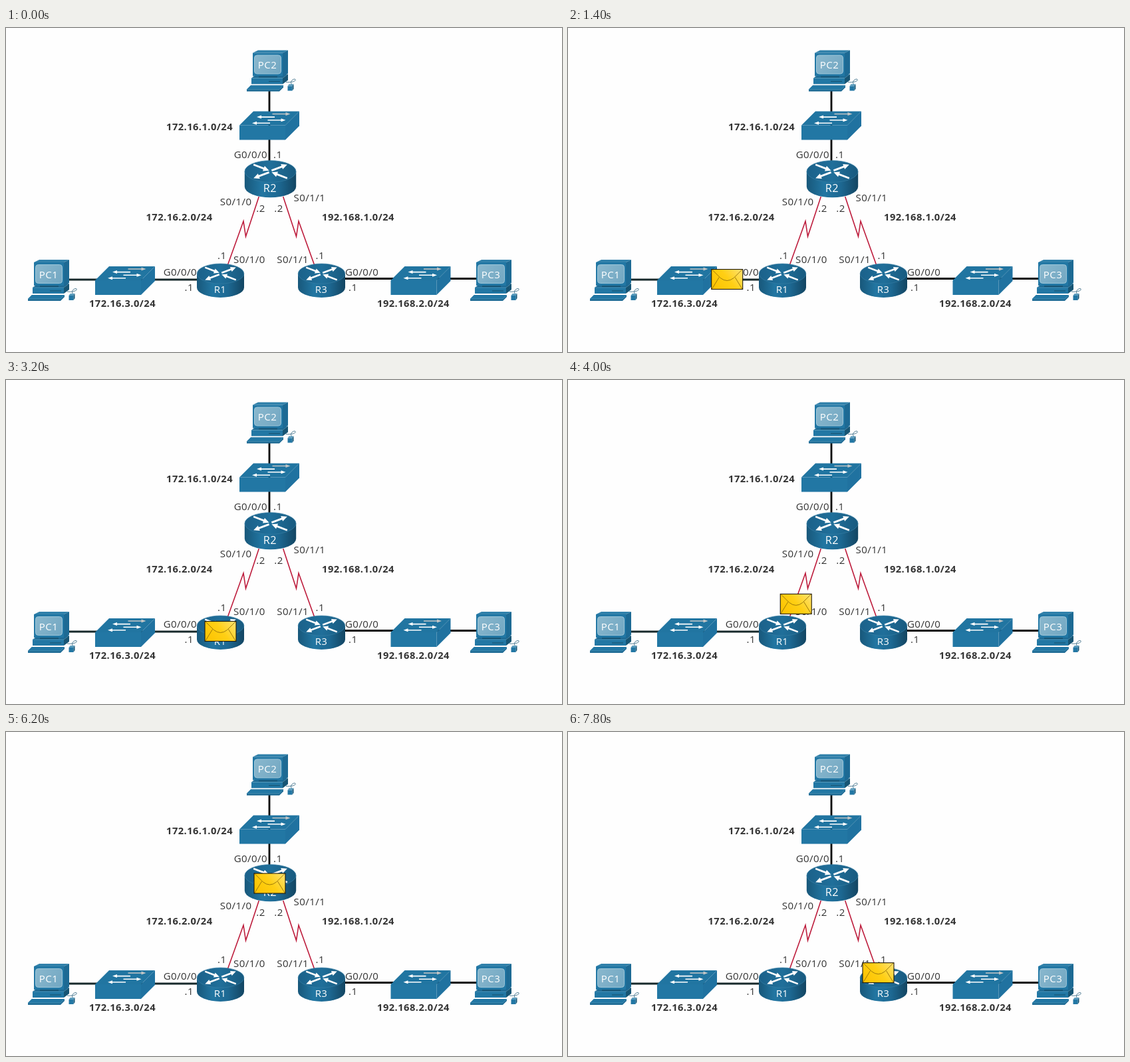
These frames come from a looping animation (836 by 488 pixels, 8000 ms). An HTML page with a canvas:

```html
<!DOCTYPE html>
<html lang="en">
<head>
<meta charset="utf-8">
<title>Packet forwarding</title>
<style>
html, body { margin: 0; width: 836px; height: 488px; overflow: hidden; background: #fefefe; }
canvas { display: block; }
</style>
</head>
<body>
<canvas id="stage" width="836" height="488"></canvas>
<script>
const ctx = document.getElementById('stage').getContext('2d');
const FONT = '"Open Sans", "Noto Sans", sans-serif';
const BLUE = '#2277a4', MID = '#1d6a94', DARK = '#175574', EDGE = '#5a9cbd';

// The packet visits these stops; every hop follows the same schedule.
const stops = [[66, 378.5], [322.5, 378.5], [396.5, 228], [474.5, 378]];
const LOOP = 8000, STEP = 200, FIRST = 610, PERIOD = 3070, TRAVEL = 1170;

const AXIS = 398.5; // the left and right branches mirror each other here
const mirror = (side, d) => AXIS + side * d;

const ramp = (t, a, b) => Math.max(0, Math.min(1, (t - a) / (b - a)));
const mix = (a, b, k) => a + (b - a) * k;

function poly(points, fill) {
  ctx.beginPath();
  points.forEach(p => ctx.lineTo(...p));
  ctx.closePath();
  ctx.fillStyle = fill;
  ctx.fill();
}

function line(points, color, width) {
  ctx.beginPath();
  points.forEach(p => ctx.lineTo(...p));
  ctx.strokeStyle = color;
  ctx.lineWidth = width;
  ctx.stroke();
}

function text(str, x, y, align = 'left', { size = 15, weight = 400, color = '#333' } = {}) {
  ctx.font = `${weight} ${size}px ${FONT}`;
  ctx.letterSpacing = '0.45px';
  ctx.fillStyle = color;
  ctx.textAlign = align;
  ctx.fillText(str, x, y);
}

const network = (str, x, y, align = 'center') => text(str, x, y, align, { size: 14.7, weight: 700 });
const caption = (str, x, y) => text(str, x, y, 'center', { color: '#fff' });

function at(x, y, scale, draw) {
  ctx.save();
  ctx.translate(x, y);
  ctx.scale(scale, scale);
  draw();
  ctx.restore();
}

function gradient(x0, y0, x1, y1, colors) {
  const g = ctx.createLinearGradient(x0, y0, x1, y1);
  colors.forEach((c, i) => g.addColorStop(i / (colors.length - 1), c));
  return g;
}

function arrow(length, half, head, headHalf, fill = '#fff') {
  const tip = length / 2, neck = tip - head;
  poly([[-tip, -half], [neck, -half], [neck, -headHalf], [tip, 0],
    [neck, headHalf], [neck, half], [-tip, half]], fill);
}

// Slab seen from above and left: front face plus a slanted top and right side.
function slab(x, y, w, h, dx, dy, front, top = front, side = front) {
  poly([[x, y], [x + dx, y - dy], [x + w + dx, y - dy], [x + w, y]], top);
  poly([[x + w, y], [x + w + dx, y - dy], [x + w + dx, y + h - dy], [x + w, y + h]], side);
  poly([[x, y], [x + w, y], [x + w, y + h], [x, y + h]], front);
}

function computer(x, y, name) {
  at(x, y, 1, () => {
    slab(7, 42, 47, 9, 8, 6, BLUE, MID, DARK);
    line([[7, 42], [54, 42]], EDGE, .7);
    line([[33, 47], [50, 47]], DARK, 1.2);
    slab(18, 38, 28, 3, 0, 0, DARK);
    slab(9, 4, 45, 35, 8, 4, BLUE, '#3181aa', MID);
    ctx.beginPath();
    ctx.roundRect(11.5, 7.5, 40, 28, 4);
    ctx.fillStyle = gradient(11, 7, 51, 36, ['#8ab8ce', '#72a7c2']);
    ctx.fill();
    ctx.strokeStyle = '#9cc6d9';
    ctx.lineWidth = 1;
    ctx.stroke();
    // keyboard
    poly([[6, 53], [55, 53], [55, 56], [49, 62], [0, 62], [0, 59]], MID);
    poly([[6, 53], [55, 53], [49, 59], [0, 59]], BLUE);
    line([[0, 59], [49, 59], [55, 53]], EDGE, .6);
    // mouse and cable
    ctx.beginPath();
    ctx.moveTo(59, 48);
    ctx.bezierCurveTo(65, 49, 75, 47, 73, 44);
    ctx.bezierCurveTo(72, 42, 63, 46, 68, 52);
    ctx.lineWidth = .9;
    ctx.strokeStyle = '#3d6f88';
    ctx.stroke();
    slab(61.5, 54, 7, 7, 2, 3, BLUE, EDGE, DARK);
    caption(name, 31, 27.5);
  });
}

function networkSwitch(x, y) {
  at(x, y, 1, () => {
    slab(0, 21, 69, 22, 21, 21, BLUE, '#2175a1', '#2072a0');
    for (let i = 0; i < 4; i++) {
      const left = i % 2;
      ctx.save();
      ctx.translate(63 - 3.5 * i - 20 * left, 4 + 4.6 * i);
      ctx.rotate(left * Math.PI);
      arrow(27, .8, 7, 2.5, i ? '#fff' : '#c3c5c5');
      ctx.restore();
    }
  });
}

function router(x, y, scale, name) {
  at(x, y, scale, () => {
    ctx.beginPath();
    ctx.ellipse(0, 21, 35.5, 15, 0, 0, Math.PI);
    ctx.lineTo(-35.5, 0);
    ctx.lineTo(35.5, 0);
    ctx.fillStyle = gradient(-35, 0, 35, 0, ['#18587b', '#2276a2', '#1d6892', '#134663']);
    ctx.fill();
    ctx.beginPath();
    ctx.ellipse(0, 0, 35.3, 15, 0, 0, Math.PI * 2);
    ctx.fillStyle = gradient(-35, 0, 35, 0, ['#1b618a', '#206f9a', '#185a7f']);
    ctx.fill();
    ctx.strokeStyle = '#347ca2';
    ctx.lineWidth = .7;
    ctx.stroke();
    // Falling diagonal points inwards, rising diagonal points outwards.
    for (const sx of [-1, 1]) {
      for (const sy of [-1, 1]) {
        ctx.save();
        ctx.translate(sx * 12.5, sy * 5.3);
        ctx.rotate(Math.atan2(sy * 8, sx * 21) + (sx === sy ? Math.PI : 0));
        arrow(23, 1.3, 8, 3.8);
        ctx.restore();
      }
    }
    caption(name, -.5, 28.8);
  });
}

function envelope(x, y, alpha) {
  ctx.globalAlpha = alpha;
  at(x, y, 1, () => {
    ctx.fillStyle = gradient(-16, 15, 20, -15, ['#fdc402', '#ffcf14', '#ffe16a']);
    ctx.fillRect(-23.5, -15, 47, 30);
    ctx.beginPath();
    ctx.moveTo(-23, -15);
    ctx.lineTo(-10, -2);
    ctx.quadraticCurveTo(0, 6, 10, -2);
    ctx.lineTo(23, -15);
    for (const side of [-1, 1]) {
      ctx.moveTo(side * 23, 15);
      ctx.lineTo(side * 12, -3);
    }
    ctx.strokeStyle = '#94700a';
    ctx.lineWidth = .9;
    ctx.stroke();
    ctx.strokeStyle = '#201a08';
    ctx.lineWidth = 1.1;
    ctx.strokeRect(-23.5, -15, 47, 30);
  });
  ctx.globalAlpha = 1;
}

function branch(side, router, serial) {
  const inner = side < 0 ? 'left' : 'right', outer = side < 0 ? 'right' : 'left';
  const bolt = [[18.2, 254], [38, 314], [41.5, 291], [65.2, 357]];
  line(bolt.map(([d, y]) => [mirror(side, d), y]), '#bd1c3c', 1.6);
  text('G0/0/0', mirror(side, 111.5), 372.5, outer);
  text('.1', mirror(side, 116.5), 396, outer);
  text(serial, mirror(side, 56.5), 354, inner);
  text('.1', mirror(side, 67), 347.5, outer);
  text('.2', mirror(side, 13.5) - 2, 277, 'center');
}

function topology() {
  ctx.fillStyle = '#fefefe';
  ctx.fillRect(0, 0, 836, 488);
  line([[396, 90], [396, 205]], '#000', 2.8);
  line([[90, 379], [300, 379]], '#17292b', 2.8);
  line([[500, 377.5], [710, 377.5]], '#000', 2.8);
  branch(-1, 'R1', 'S0/1/0');
  branch(1, 'R3', 'S0/1/1');

  computer(33, 349, 'PC1');
  computer(362, 33.5, 'PC2');
  computer(698, 349, 'PC3');
  networkSwitch(134, 359);
  networkSwitch(351, 125.5);
  networkSwitch(578.5, 359);
  router(322.5, 370, 1, 'R1');
  router(397.5, 216, 1.09, 'R2');
  router(474.5, 370, 1, 'R3');

  text('G0/0/0', 393, 196, 'right');
  text('.1', 402, 196);
  text('S0/1/0', 369.5, 266.5, 'right');
  text('S0/1/1', 432.5, 261);
  network('172.16.1.0/24', 341, 154, 'right');
  network('172.16.2.0/24', 260.5, 290);
  network('192.168.1.0/24', 529.5, 289.5);
  network('172.16.3.0/24', 175, 419.5);
  network('192.168.2.0/24', 612.5, 419.5);
}

function packet(t) {
  for (let i = 0; i < stops.length - 1; i++) {
    const local = t - FIRST - i * PERIOD;
    const alpha = ramp(local, -600, -550) * (1 - ramp(local, 1690, 2190));
    if (!alpha) continue;
    const k = ramp(local, 0, TRAVEL);
    const [[x0, y0], [x1, y1]] = stops.slice(i, i + 2);
    envelope(mix(x0, x1, k), mix(y0, y1, k), alpha);
  }
}

const start = performance.now();
function tick() {
  const now = (performance.now() - start) % LOOP;
  topology();
  packet(Math.floor(now / STEP) * STEP);
  requestAnimationFrame(tick);
}
tick();
</script>
</body>
</html>
```
